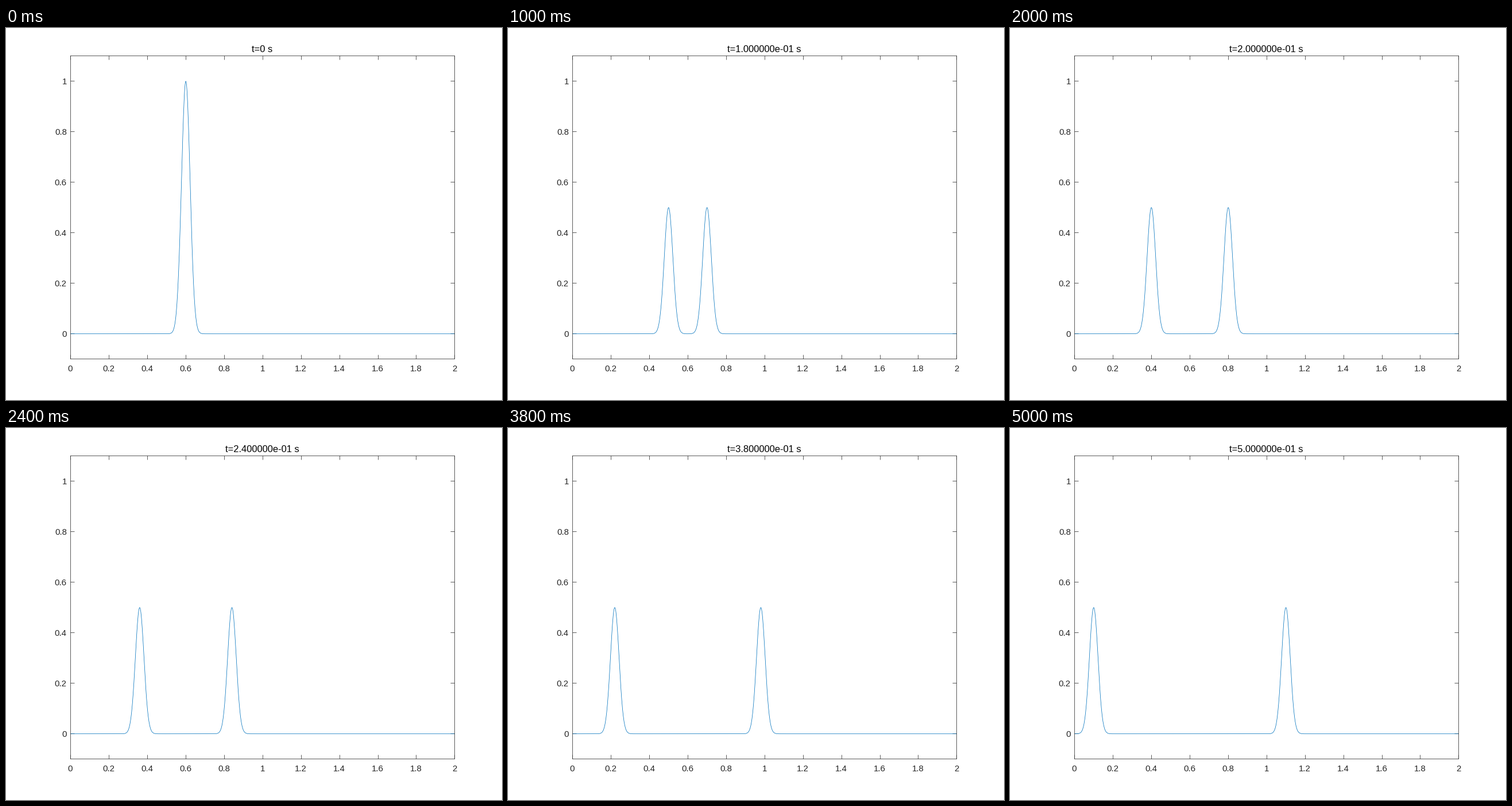
These frames come from a looping animation (864 px wide and 648 px high, 5.2 s). A matplotlib script:

```python
import numpy as np
import matplotlib.pyplot as plt
from matplotlib.animation import FuncAnimation
from matplotlib.transforms import ScaledTranslation

W, H, DPI = 864, 648, 100
FRAMES, INTERVAL = 26, 200
DT, SPEED, START, SHARPNESS = 0.02, 1.0, 0.6, 1000
INK, BLUE, STROKE = "#262626", "#0072BD", 0.75


def pt(px):
    """Pixels to points."""
    return px * 72 / DPI


plt.rcParams["font.family"] = "Liberation Sans"
fig = plt.figure(figsize=(W / DPI, H / DPI), dpi=DPI, facecolor="white")

# Half a pixel up and left, so the frame and ticks snap to the pixel grid;
# the curve and the y labels are nudged back.
ax = fig.add_axes([0.13 - 0.5 / W, 0.11 + 0.5 / H, 0.775, 0.815])
nudge = ScaledTranslation(0.5 / DPI, -0.5 / DPI, fig.dpi_scale_trans)
ax.set_xlim(0, 2)
ax.set_ylim(-0.1, 1.1)
ax.set_axisbelow(True)

ax.set_xticks(np.arange(11) / 5)
ax.set_yticks(np.arange(6) / 5)
for axis in (ax.xaxis, ax.yaxis):
    axis.set_major_formatter(lambda v, _: f"{v:g}")
ax.tick_params(direction="in", top=True, right=True, length=pt(6.7),
               width=pt(STROKE), color=INK, labelcolor=INK, labelsize=pt(15))
ax.tick_params(axis="x", pad=pt(10.5))
ax.tick_params(axis="y", pad=pt(6.5))
for label in ax.get_yticklabels():
    label.set_transform(label.get_transform() + nudge)
for spine in ax.spines.values():
    spine.set(linewidth=pt(STROKE), color=INK)

title = ax.set_title("", fontsize=pt(16.5), color="black", pad=pt(6.5))

x = np.linspace(0, 2, 1001)
curve, = ax.plot(x, 0 * x, color=BLUE, lw=pt(STROKE), clip_on=False,
                 solid_capstyle="butt", transform=ax.transData + nudge)


def pulse(center):
    return 0.5 * np.exp(-SHARPNESS * (x - center) ** 2)


def update(i):
    t = i * DT
    curve.set_ydata(pulse(START - SPEED * t) + pulse(START + SPEED * t))
    title.set_text(f"t={t:.6e} s" if i else "t=0 s")
    return curve, title


anim = FuncAnimation(fig, update, frames=FRAMES, interval=INTERVAL,
                     repeat=True, repeat_delay=0)
plt.show()
```
